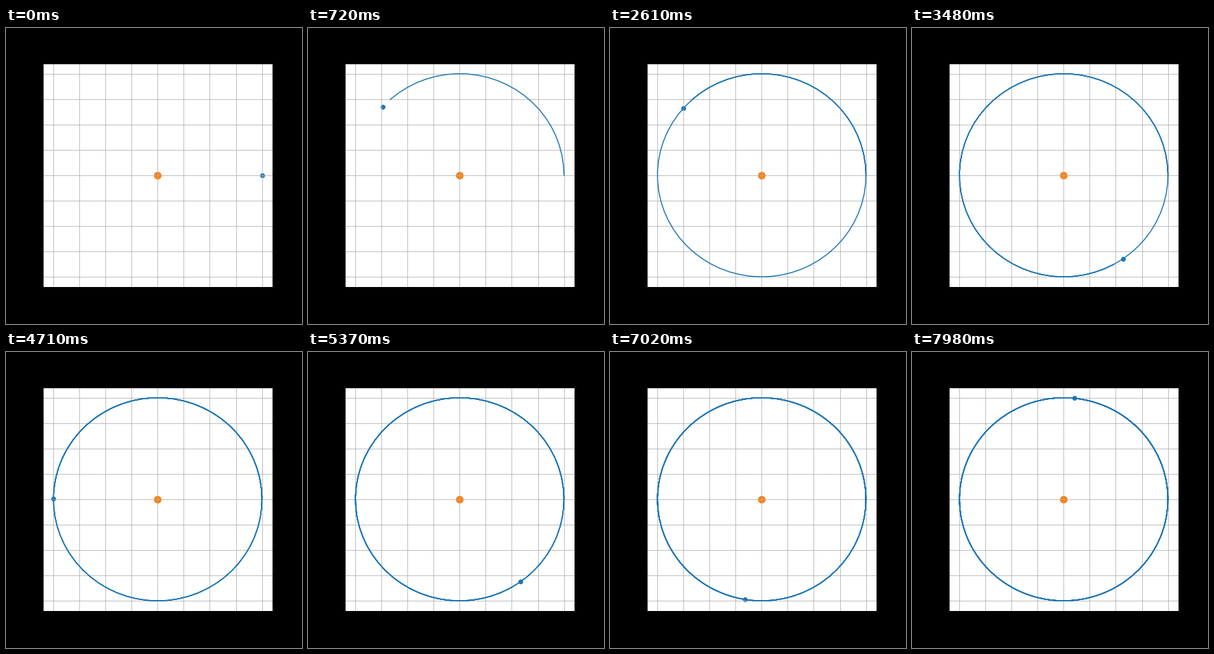
A matplotlib script that plays this animation: 432 by 432 pixels, repeating every 8 s.

```python
import numpy as np
import matplotlib.pyplot as plt
from matplotlib.animation import FuncAnimation

TICK = 10        # ms per drawn frame
HOLD = 3         # drawn frames per orbit step
FRAMES = 800
STEP = 0.1       # radians per orbit step
LIMIT = 1.1      # unit orbit plus margin

angles = STEP * np.arange(FRAMES // HOLD + 1)
orbit = np.column_stack([np.cos(angles), np.sin(angles)])

fig = plt.figure(figsize=(6, 6), dpi=72, facecolor="black")
ax = fig.add_axes([0.125, 0.125, 0.775, 0.755], facecolor="white")
ax.set_xlim(-LIMIT, LIMIT)
ax.set_ylim(-LIMIT, LIMIT)
ticks = np.linspace(-1, 1, 9)
ax.set_xticks(ticks)
ax.set_yticks(ticks)
ax.tick_params(length=0, labelbottom=False, labelleft=False)
ax.grid(True, color="#b0b0b0", linewidth=0.8)

# Scatter markers sit below the grid, the trail above it.
planet = ax.scatter([1], [0], s=36, color="#1f77b4")
star = ax.scatter([0], [0], s=100, color="#ff7f0e")
trail, = ax.plot([], [], color="#1f77b4", linewidth=1.5)


def update(frame):
    step = frame // HOLD
    planet.set_offsets(orbit[step])
    trail.set_data(orbit[:step, 0], orbit[:step, 1])
    return planet, trail


def reset():
    return update(0)


anim = FuncAnimation(fig, update, frames=FRAMES, init_func=reset,
                     interval=TICK, repeat=True, repeat_delay=0, blit=False)
plt.show()
```
